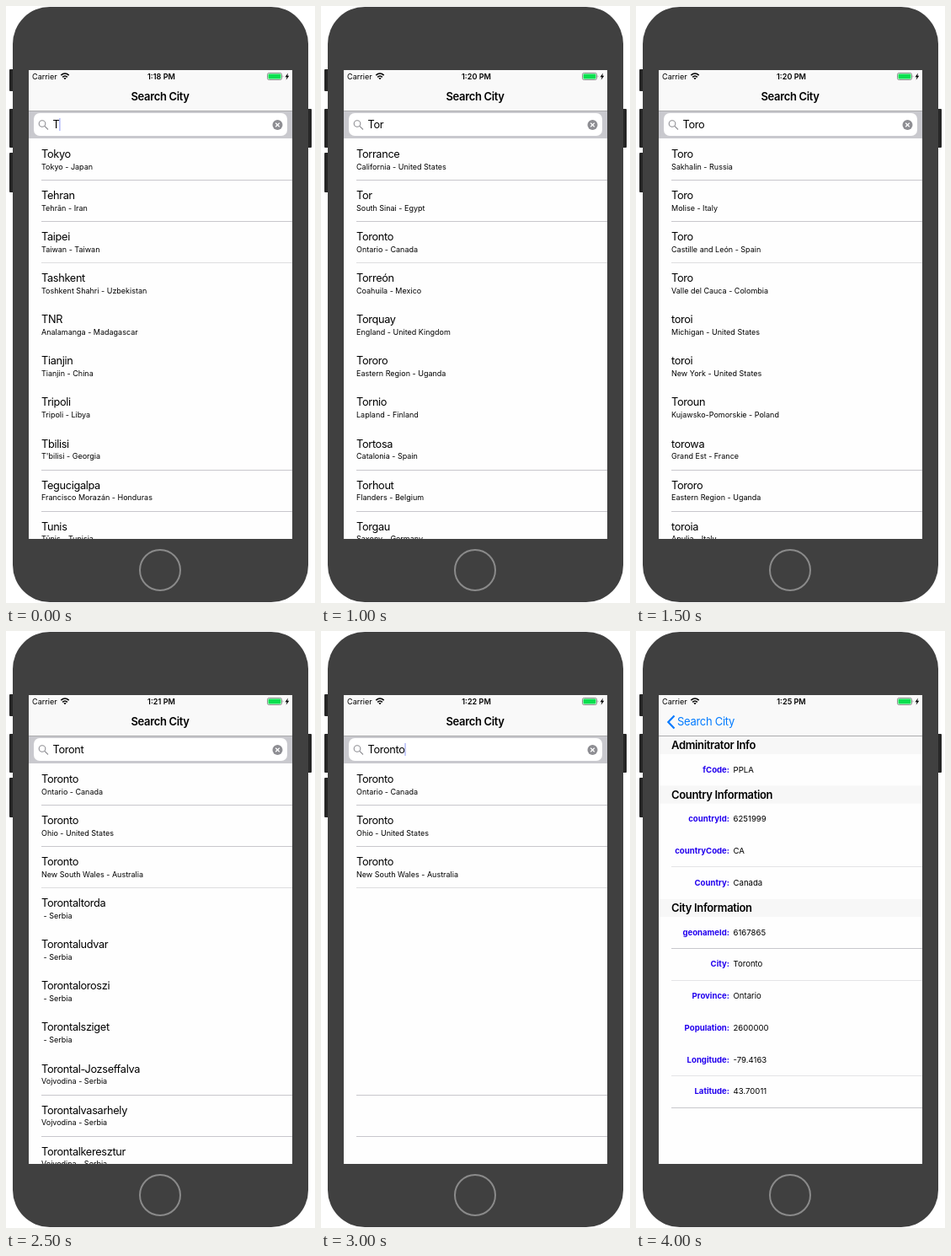
These frames come from a looping animation (367 px wide and 708 px high, 5500 ms). An HTML page:

```html
<!DOCTYPE html>
<html lang="en">
<head>
<meta charset="utf-8">
<title>City search</title>
<style>
  html, body { margin: 0; width: 100%; height: 100%; overflow: hidden; background: #fff; }
  svg { display: block; }
  text { font-family: Inter, Roboto, sans-serif; white-space: pre; fill: #000; }
  .status { font-size: 9.1px; }
  .clock { font-weight: 600; text-anchor: middle; }
  .name { font-size: 12.75px; letter-spacing: -.33px; }
  .region { font-size: 9px; }
  .heading { font-size: 13px; font-weight: 600; letter-spacing: -.35px; }
  .back { font-size: 13px; letter-spacing: -.3px; fill: #007aff; }
  .label, .value { font-size: 9.6px; }
  .label { font-weight: 700; text-anchor: end; fill: #2200ee; }
</style>
</head>
<body>
<svg width="367" height="708" viewBox="0 0 367 708">
  <clipPath id="screen"><rect x="27" y="76" width="313" height="556"/></clipPath>
  <g fill="#262626">
    <rect x="4" y="75" width="6" height="26" rx="1"/>
    <rect x="4" y="122" width="6" height="46" rx="1"/>
    <rect x="4" y="174" width="6" height="47" rx="1"/>
    <rect x="357" y="122" width="6" height="46" rx="1"/>
  </g>
  <rect x="8" y="1" width="351" height="706" rx="44" fill="#404040"/>
  <circle cx="183" cy="669" r="24" fill="none" stroke="#8a8a8a" stroke-width="2"/>
  <g clip-path="url(#screen)">
    <rect x="27" y="76" width="313" height="556" fill="#fefefe"/>
    <g id="content"></g>
    <rect x="27" y="76" width="313" height="48" fill="#f9f9f9"/>
    <rect x="27" y="124" width="313" height="1" fill="#acacae"/>
    <text class="status" x="31" y="87">Carrier</text>
    <g fill="none" stroke="#000" stroke-width="1.6">
      <path d="M65.3 82.2Q70 77.8 74.700 82.200M67.200 84.300Q70 81.700 72.800 84.300"/>
      <path d="M70 87.300L68.300 85.600Q70 84.300 71.700 85.600Z" fill="#000" stroke="none"/>
    </g>
    <rect x="310.500" y="79.500" width="17" height="8" rx="1.800" fill="#fff" stroke="#777" stroke-width=".8"/>
    <rect x="311.500" y="80.500" width="15" height="6" rx="1" fill="#0be04f"/>
    <path d="M328.700 82v3q1.300-1.500 0-3" fill="#777"/>
    <path d="M335 79.500L331.500 84.200H333.600L332.600 87.800L336.300 82.800H334.200Z"/>
    <text id="clock" class="status clock" x="184.500" y="87"></text>
    <g id="bar"></g>
  </g>
</svg>
<script>
const LOOP = 5500;
const ROW = 49.1, LIST_TOP = 157.5;

// Each row is "name|region".
const searches = [
  { at: 0, clock: '1:18', query: 'T', caret: true, rows: [
    'Tokyo|Tokyo - Japan', 'Tehran|Tehrān - Iran', 'Taipei|Taiwan - Taiwan',
    'Tashkent|Toshkent Shahri - Uzbekistan', 'TNR|Analamanga - Madagascar',
    'Tianjin|Tianjin - China', 'Tripoli|Tripoli - Libya', 'Tbilisi|T\'bilisi - Georgia',
    'Tegucigalpa|Francisco Morazán - Honduras', 'Tunis|Tūnis - Tunisia'] },
  { at: 500, clock: '1:19', query: 'To', rows: [
    'Topeka|Kansas - United States', 'Tomsk|Tomsk - Russia', 'Tobruk|Sha‘biyat al Buţnān - Libya',
    'Torrance|California - United States', 'Toledo|Ohio - United States', 'TOS|Troms - Norway',
    'Toyama|Toyama - Japan', 'Toledo|Paraná - Brazil', 'Tor|South Sinai - Egypt',
    'Tok|Alaska - United States'] },
  { at: 1000, clock: '1:20', query: 'Tor', rows: [
    'Torrance|California - United States', 'Tor|South Sinai - Egypt', 'Toronto|Ontario - Canada',
    'Torreón|Coahuila - Mexico', 'Torquay|England - United Kingdom', 'Tororo|Eastern Region - Uganda',
    'Tornio|Lapland - Finland', 'Tortosa|Catalonia - Spain', 'Torhout|Flanders - Belgium',
    'Torgau|Saxony - Germany'] },
  { at: 1500, clock: '1:20', query: 'Toro', rows: [
    'Toro|Sakhalin - Russia', 'Toro|Molise - Italy', 'Toro|Castille and León - Spain',
    'Toro|Valle del Cauca - Colombia', 'toroi|Michigan - United States',
    'toroi|New York - United States', 'Toroun|Kujawsko-Pomorskie - Poland',
    'torowa|Grand Est - France', 'Tororo|Eastern Region - Uganda', 'toroia|Apulia - Italy'] }
];

const torontos = ['Toronto|Ontario - Canada', 'Toronto|Ohio - United States',
  'Toronto|New South Wales - Australia'];
const serbian = ['Torontaltorda| - Serbia', 'Torontaludvar| - Serbia', 'Torontaloroszi| - Serbia',
  'Torontalsziget| - Serbia', 'Torontal-Jozseffalva|Vojvodina - Serbia',
  'Torontalvasarhely|Vojvodina - Serbia'];

const scenes = [
  ...searches,
  { at: 2000, clock: '1:21', query: 'Toron',
    rows: [...torontos, 'toronhaimu|Sør-Trøndelag - Norway', ...serbian] },
  { at: 2500, clock: '1:21', query: 'Toront',
    rows: [...torontos, ...serbian, 'Torontalkeresztur|Vojvodina - Serbia'] },
  { at: 3000, clock: '1:22', query: 'Toronto', caret: true, rows: torontos },
  { at: 3500, clock: '1:24', query: 'Toronto', caret: true, rows: torontos, pressed: true },
  { at: 4000, clock: '1:25' }
];

const sections = [
  { top: 125, title: 'Adminitrator Info', fields: ['fCode|PPLA'] },
  { top: 183.5, title: 'Country Information',
    fields: ['countryId|6251999', 'countryCode|CA', 'Country|Canada'] },
  { top: 318, title: 'City Information',
    fields: ['geonameId|6167865', 'City|Toronto', 'Province|Ontario', 'Population|2600000',
      'Longitude|-79.4163', 'Latitude|43.70011'] }
];

const byId = id => document.getElementById(id);
const text = (cls, x, y, s) => `<text class="${cls}" x="${x}" y="${y}">${s}</text>`;
const box = (x, y, w, h, fill, rx = 0) =>
  `<rect x="${x}" y="${y}" width="${w}" height="${h}" rx="${rx}" fill="${fill}"/>`;
const rule = (y, fill = '#c8c7cc') => box(42, y, 298, 1, fill);

function drawSearch({ query, rows, pressed, caret }) {
  const list = rows.map((row, i) => {
    const [name, region] = row.split('|');
    const y = LIST_TOP + i * ROW;
    return text('name', 42, y + 22.3, name) + text('region', 42, y + 36, region);
  });
  byId('content').innerHTML =
    (pressed ? box(27, 157, 313, 50, '#d9d9d9') : '') +
    rule(206) + rule(255) + rule(304, '#dededf') + rule(550) + rule(599) + list.join('') +
    box(27, 125, 313, 32, '#c9c9ce') + box(33, 127, 301, 27, '#fff', 7) +
    `<g fill="none" stroke="#8e8e93" stroke-width="1.1">
      <circle cx="43" cy="139.500" r="3.800"/><path d="M45.800 142.300L50 146.500"/></g>
    <circle cx="322.500" cy="141" r="6" fill="#8e8e93"/>
    <path d="M320.200 138.700l4.600 4.600m0-4.600l-4.600 4.600" stroke="#fff" stroke-width="1.300"/>` +
    text('name query', 55.5, 144.8, query);
  byId('bar').innerHTML = text('heading', 148.5, 112, 'Search City');
  if (caret) {
    const width = document.querySelector('.query').getComputedTextLength();
    byId('content').insertAdjacentHTML('beforeend', box(55.5 + width, 133, 1, 15, '#8c98f5'));
  }
}

function drawDetails() {
  const parts = sections.map(({ top, title, fields }) =>
    box(27, top, 313, 21, '#f7f7f7') + text('heading', 42, top + 15, title) +
    fields.map((field, i) => {
      const [label, value] = field.split('|');
      const y = top + 42.7 + i * 37.75;
      return text('label', 111, y, label + ':') + text('value', 115.5, y, value);
    }).join(''));
  byId('content').innerHTML = parts.join('') +
    [279, 414, 527].map(y => rule(y, '#e4e4e6')).join('') + rule(376) + rule(565);
  byId('bar').innerHTML =
    '<path d="M45.500 100.500L38.300 108L45.500 115.500" fill="none" stroke="#007aff" stroke-width="2.200"/>' +
    text('back', 49, 112, 'Search City');
}

let shown;
function tick() {
  const time = performance.now() % LOOP;
  const scene = scenes.findLast(s => s.at <= time);
  if (scene !== shown) {
    shown = scene;
    byId('clock').textContent = scene.clock + ' PM';
    scene.query ? drawSearch(scene) : drawDetails();
  }
  requestAnimationFrame(tick);
}
tick();
</script>
</body>
</html>
```
